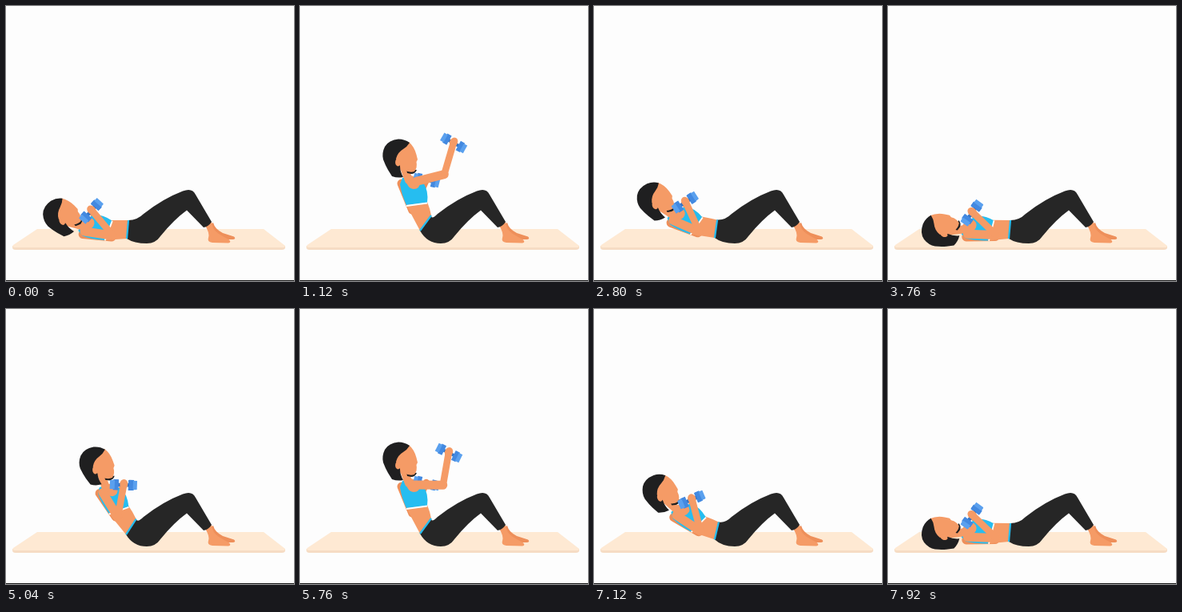
An HTML page with a canvas for the animation above (8000 ms loop, 360x344 px).

```html
<!DOCTYPE html>
<html lang="en">
<head>
<meta charset="utf-8">
<title>Sit-up punches</title>
<style>
html, body { margin: 0; width: 100%; height: 100%; overflow: hidden; background: #fdfdfd; }
canvas { display: block; }
</style>
</head>
<body>
<canvas id="stage" width="360" height="344"></canvas>
<script>
const ctx = document.getElementById('stage').getContext('2d');
const LOOP = 8000, CYCLE = 4420;
const SKIN = '#f59b66', SKIN_DARK = '#ee8f5a', CYAN = '#26bdf0', BLACK = '#262626', HAIR = '#1f1f20';

// Pose: chest x, y, angle; head x, y, angle; hip roll
const FLAT = [129, 281, -68, 70, 286, -65, 0];
const LIFT = [128, 281, -62, 70, 270, -30, 0];
const LOW = [128, 275, -47, 76, 250, -21, 0.1];
const MID = [133, 266, -31, 87, 228, -14, 0.4];
const HIGH = [141, 252, -12, 111, 202, -5, 0.88];
const UP = [146, 248, 0, 122, 196, 0, 1];
const KEYS = [
  [-220, FLAT], [0, LIFT], [140, LOW], [300, MID], [620, HIGH], [860, UP],
  [2140, UP], [2400, HIGH], [2640, MID], [2800, LOW], [3040, LIFT], [3400, FLAT], [4200, FLAT]
];

const rad = d => d * Math.PI / 180;
const mix = (a, b, k) => a + (b - a) * k;

function slope(i, j) {
  if (i < 1 || i > KEYS.length - 2) return 0;
  const [a, b, c] = [KEYS[i - 1], KEYS[i], KEYS[i + 1]];
  const d1 = (b[1][j] - a[1][j]) / (b[0] - a[0]);
  const d2 = (c[1][j] - b[1][j]) / (c[0] - b[0]);
  return d1 * d2 <= 0 ? 0 : 2 * d1 * d2 / (d1 + d2);
}

function poseAt(p) {
  let i = 0;
  while (i < KEYS.length - 2 && p >= KEYS[i + 1][0]) i++;
  const [t0, a] = KEYS[i], [t1, b] = KEYS[i + 1];
  const h = t1 - t0, s = Math.min(1, Math.max(0, (p - t0) / h));
  const s2 = s * s, s3 = s2 * s;
  return a.map((v, j) =>
    v * (2 * s3 - 3 * s2 + 1) + b[j] * (3 * s2 - 2 * s3) +
    h * slope(i, j) * (s3 - 2 * s2 + s) + h * slope(i + 1, j) * (s3 - s2));
}

function bump(p, from, to) {
  return p < from || p > to ? 0 : Math.sin(Math.PI * (p - from) / (to - from)) ** 2;
}

function fill(d, color) {
  ctx.fillStyle = color;
  ctx.fill(new Path2D(d));
}

function line(points, width, color, cap = 'round') {
  ctx.strokeStyle = color;
  ctx.lineWidth = width;
  ctx.lineCap = cap;
  ctx.lineJoin = 'round';
  ctx.beginPath();
  points.forEach(([x, y]) => ctx.lineTo(x, y));
  ctx.stroke();
}

function oval(x, y, rx, ry, color) {
  ctx.fillStyle = color;
  ctx.beginPath();
  ctx.ellipse(x, y, rx, ry, 0, 0, Math.PI * 2);
  ctx.fill();
}

function at(x, y, deg, draw) {
  ctx.save();
  ctx.translate(x, y);
  ctx.rotate(rad(deg));
  draw();
  ctx.restore();
}

function place(x, y, deg, px, py) {
  const c = Math.cos(rad(deg)), s = Math.sin(rad(deg));
  return [x + px * c - py * s, y + px * s + py * c];
}

function room() {
  ctx.fillStyle = '#fdfdfd';
  ctx.fillRect(0, 0, 360, 344);
  fill('M8 300 L349 300 L349 303 Q348 305 345 305 L12 305 Q8 305 8 302 Z', '#f6dcc4');
  fill('M39 279 L322 279 L349 300 Q349 302 346 302 L11 302 Q7 302 9 299 Z', '#fee9d3');
  ctx.fillStyle = '#161616';
  ctx.fillRect(0, 343, 360, 1);
}

function legs(A, B) {
  fill('M254 274 L259 271 Q261 279 271 284 L285 288.5 Q288 291 284 292 L262 292 Z', SKIN_DARK);
  fill('M249 275 L257 270 Q258 280 266 285 L279 292.5 Q282 295.5 278 296.5 L258 296 Q251 295 253 290 Q255 284 249 275 Z', SKIN);
  fill(`M${A} Q164 268 172 260 Q196 241 221 231.5 Q233 227 237 236
    L257 270 Q253 276 247 277 L226 255.5
    Q210 267 193 288 Q187 297 176 297 Q${B[0] + 9} 297 ${B} Z`, BLACK);
  line([A, B], 2.2, CYAN, 'butt');
}

function torso(cx, cy, deg, A, B) {
  const back = place(cx, cy, deg, -13, 1), front = place(cx, cy, deg, 13, -3);
  fill(`M${back} L${front} Q${mix(front[0], A[0], .5) + 1} ${mix(front[1], A[1], .5)} ${A} L${B} Z`, SKIN);
  at(cx, cy, deg, () => {
    fill('M-13 1 Q-19 -13 -20 -27 Q-17 -36 -8 -36 Q4 -34 12 -15 L13 -2 Z', SKIN);
    fill(`M-13 1 Q-19 -12 -21 -25 L-18 -33 L-14 -34 Q-13 -20 -4 -19
      Q4 -19 4 -28 L8 -27 Q15 -17 13 -2 Z`, CYAN);
    line([[-13, 2], [13, -1.5]], 1.8, '#ffffff', 'butt');
  });
}

function head(x, y, deg) {
  at(x, y, deg, () => {
    fill('M11 8 L24 9 Q22 14 17 14 L12 13 Z', HAIR);
    fill('M-5 -18 L14 -26 Q21 -20 23.5 -10 L25 -4 L23.5 -1 Q25 6 21 11 Q15 13 8 9 L-3 8 Z', SKIN);
    fill(`M15 -25 Q9 -29.5 1 -29.5 Q-11 -28.5 -16 -20 Q-20 -12 -18 -4 Q-15 4 -12 9 L-7 17
      Q0 19.5 7 18 Q3 11 3 4 L-2 -5 Q0 -13 7 -17 Q12 -20 15 -25 Z`, HAIR);
    oval(0.5, -0.5, 3.4, 5, SKIN);
  });
}

function dumbbell(x, y, deg) {
  at(x, y, deg, () => {
    ctx.fillStyle = '#3474c4';
    ctx.fillRect(-12, -2, 24, 4);
    for (const side of [-1, 1]) {
      ctx.fillStyle = '#4389e0';
      ctx.fillRect(side * 9.5 - 3, -6.5, 6, 13);
      ctx.fillStyle = '#5aa0ee';
      ctx.fillRect(side * 14 - 2.5, -5.5, 5, 11);
    }
  });
}

// Two-bone arm with the elbow hanging below the line to the hand
function arm(S, H, color) {
  const upper = 36, fore = 42;
  const dx = H[0] - S[0], dy = H[1] - S[1], d = Math.hypot(dx, dy);
  const along = (upper ** 2 - fore ** 2 + d * d) / (2 * d);
  const off = Math.sqrt(Math.max(0, upper ** 2 - along ** 2));
  const E = [S[0] + (dx * along - dy * off) / d, S[1] + (dy * along + dx * off) / d];
  line([S, E], 11, color);
  line([E, H], 8.5, color);
}

function reach(cx, cy, deg, k, shift) {
  const S = place(cx, cy, deg, mix(-15 + shift, 2, k), mix(-26, -29, k));
  const H = place(cx, cy, deg, mix(13 + shift / 4, 52, k), mix(-31, -86, k));
  return { S, H, turn: mix(deg + 14, 32, k) };
}

function sideArm({ S, H, turn }, color) {
  dumbbell(H[0], H[1] + 1, turn);
  arm(S, H, color);
  at(H[0], H[1], turn, () => oval(0, 0, 5, 6, color));
}

function draw(t) {
  let p = t % CYCLE;
  if (p > 4200) p -= CYCLE;
  const [cx, cy, cd, hx, hy, hd, roll] = poseAt(p);
  const A = [mix(153, 164, roll), mix(268, 262, roll)];
  const B = [mix(151, 150, roll), mix(291, 281, roll)];
  const near = reach(cx, cy, cd, bump(p, 860, 1560), 0);
  const far = reach(cx, cy, cd, bump(p, 1380, 2060), -4);

  room();
  arm(far.S, far.H, SKIN_DARK);
  torso(cx, cy, cd, A, B);
  legs(A, B);
  line([place(hx, hy, hd, 8, 6), place(cx, cy, cd, -10, -30)], 10, SKIN);
  head(hx, hy, hd);
  if (far.H[0] > cx + 16) sideArm(far, SKIN_DARK);
  else dumbbell(far.H[0], far.H[1] + 1, far.turn);
  sideArm(near, SKIN);
}

const start = performance.now();
function tick() {
  draw((performance.now() - start) % LOOP);
  requestAnimationFrame(tick);
}
draw(0);
requestAnimationFrame(tick);
</script>
</body>
</html>
```
